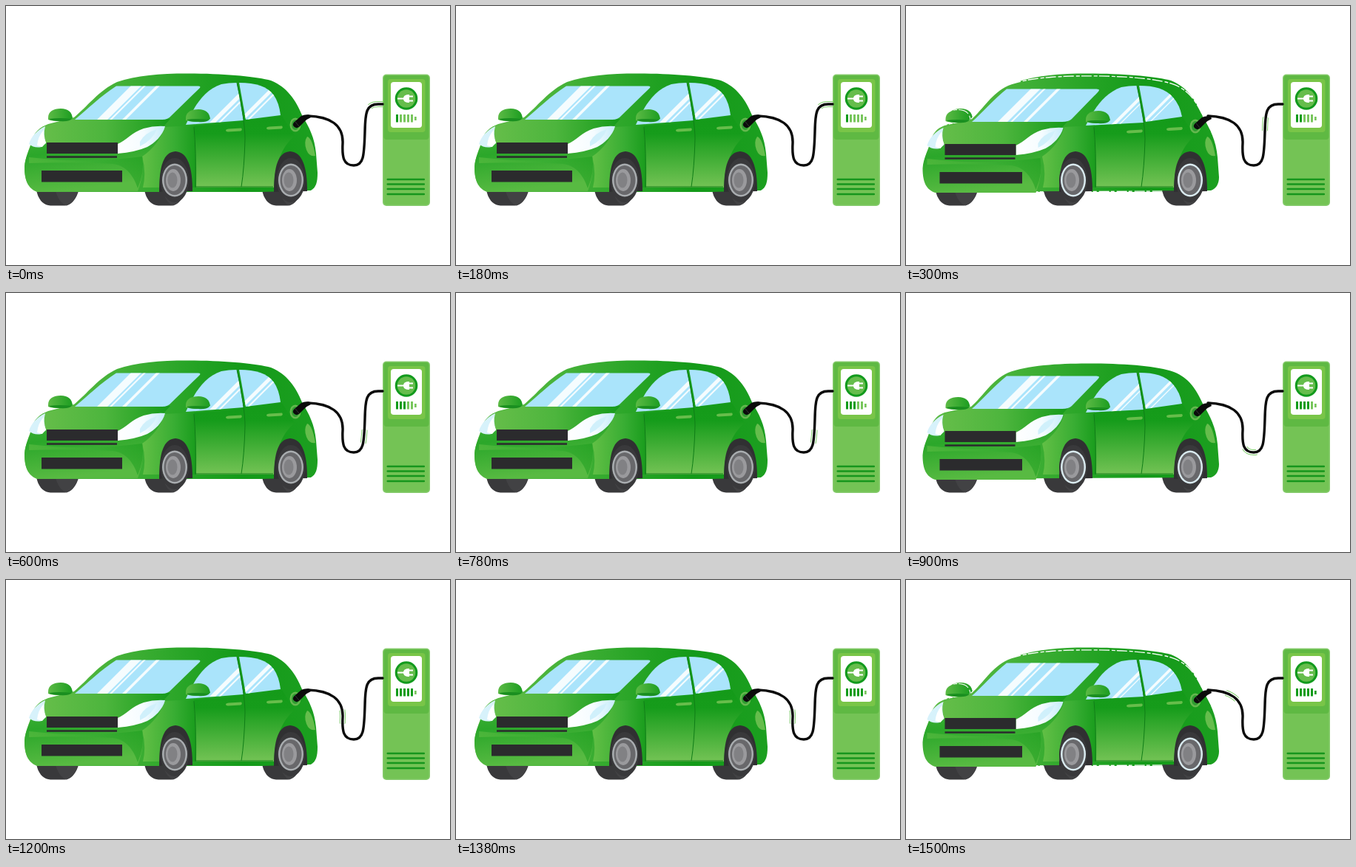
These frames come from a looping animation (600 by 351 pixels, 1.8 s). An HTML page:

```html
<!DOCTYPE html>
<html lang="en">
<head>
<meta charset="utf-8">
<title>Charging car</title>
<style>
  html, body { margin: 0; width: 100%; height: 100%; overflow: hidden; background: #fff; }
  svg { display: block; width: 100%; height: 100%; }
</style>
</head>
<body>
<svg id="stage" viewBox="0 0 600 351">
  <defs>
    <linearGradient id="paint">
      <stop offset="0" stop-color="#5cbb44"/><stop offset=".3" stop-color="#46b239"/>
      <stop offset=".6" stop-color="#22a223"/><stop offset=".75" stop-color="#149a19"/>
      <stop offset="1" stop-color="#1c9f20"/>
    </linearGradient>
    <linearGradient id="hood">
      <stop offset="0" stop-color="#66be4a"/><stop offset=".5" stop-color="#4db53d"/>
      <stop offset="1" stop-color="#159b1a"/>
    </linearGradient>
    <linearGradient id="door" x1="0" y1="0" x2="0" y2="1">
      <stop offset="0" stop-color="#149a19"/><stop offset=".25" stop-color="#169c1b"/>
      <stop offset="1" stop-color="#74c355"/>
    </linearGradient>
    <linearGradient id="face" x1="0" y1="0" x2=".25" y2="1">
      <stop offset="0" stop-color="#48b43b"/><stop offset=".45" stop-color="#2ba72a"/>
      <stop offset="1" stop-color="#58ba42"/>
    </linearGradient>
    <linearGradient id="fender">
      <stop offset="0" stop-color="#62bf45"/><stop offset=".6" stop-color="#38ad33"/>
      <stop offset="1" stop-color="#199c1c"/>
    </linearGradient>
    <linearGradient id="mirror">
      <stop offset="0" stop-color="#5cba45"/><stop offset="1" stop-color="#1c9d20"/>
    </linearGradient>
    <linearGradient id="lamp">
      <stop offset="0" stop-color="#fff"/><stop offset=".55" stop-color="#f5fcff"/>
      <stop offset="1" stop-color="#c5ecfa"/>
    </linearGradient>
  </defs>
  <g id="car"></g>
  <g id="charger"></g>
  <g fill="none">
    <path id="spark" stroke="#7fce6c" stroke-width="8"/>
    <path id="sparkGap" stroke="#fff" stroke-width="6"/>
    <path id="cable" stroke="#0b0b0b" stroke-width="3.4" stroke-linecap="round"/>
  </g>
  <g id="nozzle"></g>
</svg>
<script>
const STEP = 300, STEPS = 6;
const byId = id => document.getElementById(id);
const path = (d, fill, extra = "") => `<path d="${d}" fill="${fill}" ${extra}/>`;
const line = (d, color, width, extra = "") =>
  path(d, "none", `stroke="${color}" stroke-width="${width}" ${extra}`);
const rect = (x, y, w, h, fill, r = 0) =>
  `<rect x="${x}" y="${y}" width="${w}" height="${h}" rx="${r}" fill="${fill}"/>`;
const oval = (x, y, rx, ry, fill) =>
  `<ellipse cx="${x}" cy="${y}" rx="${rx}" ry="${ry}" fill="${fill}"/>`;
const move = (x, y, parts) => `<g transform="translate(${x} ${y})">${parts}</g>`;
const clipped = (id, d, fill, parts) =>
  `<clipPath id="${id}"><path d="${d}"/></clipPath>` + path(d, fill) +
  `<g clip-path="url(#${id})">${parts}</g>`;

// A slanted reflection running down and to the left across a window
const shine = (x, top, width) =>
  path(`M${x} ${top}h${width}l-50 50h${-width}Z`, "#fff", 'opacity=".88"');

const MIRROR = "M0 12C0 4 7 0 17 0C27 0 32 5 33 13Q27 17 17 17Q5 17 0 15Z";

const POSES = [
  {
    body: "M42 252C30 247 25 237 25 218C26 205 31 196 35 182C38 171 46 164 57 160L92 151" +
      "C109 137 126 114 150 103C178 93 215 91 255 91.5C300 92 340 96 358 101" +
      "C380 110 392 128 400 148C410 165 417 178 419 200L421 226C421 239 419 246 412 250L345 252Z",
    windshield: "M93 154C111 139 128 122 149 108.5H258Q265 108 261 112L223 149Q219 154 211 154Z",
    front: "M243 161C253 139 266 114 291 106Q301 104 312 104L321 155Z",
    rear: "M315 104C338 104 353 109 362 121Q369 131 371 148L324 154Z",
    shift: [0, 0], far: [57, 139], near: [243, 140], glassTop: 108,
    glints: [[169, 14], [186, 3], [203, 5]], sideGlints: [[325, 8], [337, 3], [361, 7], [372, 3]],
    handles: [[297, 166], [352, 163]], rim: 228, rearRim: 385, ring: "#a9adb0"
  },
  {
    body: "M40 252C28 248 23 238 23 220C24 207 29 198 33 184C36 173 41 166 52 162L88 154" +
      "C104 140 116 118 138 108C165 97 215 95 255 95.5C300 96 340 99 362 107" +
      "C382 115 392 130 401 150C411 167 419 182 421 205L423 232C423 241 419 248 412 250Z",
    windshield: "M89 157C104 144 118 127 136 112.5H256Q264 112 259 117L224 153Q220 157 211 157Z",
    front: "M243 162C253 142 266 119 291 110Q301 108 312 108L321 158Z",
    rear: "M315 108C336 108 351 112 361 124Q370 134 373 150L324 157Z",
    shift: [-2.5, 2], far: [53.5, 141], near: [243, 142], glassTop: 112,
    glints: [[169, 13], [186, 3], [204, 5]], sideGlints: [[326, 6], [336, 2], [364, 5], [374, 2]],
    handles: [[298, 168], [352, 164.5]], rim: 226, rearRim: 384, ring: "#d9eaef"
  }
];

function arch(x) {
  return path(`M${x} 252C${x} 216 ${x + 6} 198 ${x + 22} 197` +
    `C${x + 38} 198 ${x + 45} 217 ${x + 45} 251Z`, "#303032");
}

function wheel(x, ring) {
  return oval(x, 236, 19, 30, "#39393b") + oval(x, 236, 17, 22.5, ring) +
    oval(x, 236, 14.5, 20, "#68686b") + oval(x - 2, 236, 10, 15, "#9a9a9d") +
    oval(x - 3, 236, 6.5, 10.5, "#818184");
}

function tyre(x, width) {
  return path(`M${x} 238C${x} 258 ${x + 8} 270 ${x + 20} 270.5H${x + width - 20}` +
    `C${x + width - 8} 270 ${x + width} 252 ${x + width} 238Z`, "#39393b") +
    path(`M${x + width * .4} 240Q${x + width * .5} 268 ${x + width - 18} 270.5` +
    `Q${x + width - 4} 264 ${x + width} 240Z`, "#424244");
}

function sideMirror(x, y) {
  return move(x, y, path(MIRROR, "url(#mirror)") +
    path("M1 14Q16 12 32 14Q27 18 17 17Q5 17 1 14Z", "#1a8f20"));
}

// The raised outline that lingers behind the lowered car
function afterimage(low) {
  const high = POSES[0], gap = 'stroke-dasharray="14 3 5 2"';
  return path(high.body, "url(#paint)") + sideMirror(...high.far) +
    line(low.body, "#fff", 2.6, gap) + move(...low.far, line(MIRROR, "#fff", 2, gap));
}

function carFront(dx) {
  const leftLamp = path("M53 163C42 168 34 177 31 187Q38 193 48 191L54 186Q50 174 53 163Z", "#d7f2fb") +
    path("M51 168Q43 177 42 189L49 191L54 185Q50 176 51 168Z", "#fff");
  const rightLamp = path("M151 187C163 182 170 171 186 166Q200 162 215 163C212 175 201 186 191 191" +
      "Q175 198 151 200Z", "url(#lamp)") +
    path("M181 184Q187 172 204 167Q198 182 181 190Z", "#d0f0fb");
  return path("M36 183C40 171 47 165 60 161L210 162Q207 184 184 203Q188 224 178 251H42" +
      "C30 247 25 237 25 218C26 205 31 196 36 183Z", "url(#face)") +
    path("M47 166Q54 161 92 153H222L213 163Q185 164 151 187H55Q49 176 47 166Z", "url(#hood)") +
    path("M31 205Q108 214 184 204Q188 224 178 247Q168 217 145 214Q83 211 31 213Z", "url(#fender)", 'opacity=".55"') +
    leftLamp + rightLamp +
    rect(55, 185, 96, 15, "#2b2b2d") + rect(55, 203.3, 95, 2.5, "#2b2b2d") +
    rect(48, 223, 109 - dx, 15.5, "#2b2b2d");
}

function drawCar(p, index, ghost) {
  const shines = glints => glints.map(([x, width]) => shine(x, p.glassTop, width)).join("");
  const [dx, dy] = p.shift;
  const glass = (name, glints) => clipped(name + index, p[name], "#aae4fb", shines(glints));

  return (ghost ? afterimage(p) : "") +
    tyre(40 + dx * .5, 60) + tyre(186 + dx * .5, 58) + tyre(345, 56) +
    path(p.body, "url(#paint)") +
    path("M184 204Q207 188 214 164L254 162L257 246H185Q190 226 184 204Z", "url(#fender)") +
    path("M254 162Q310 160 373 149L390 176Q364 198 362 246H257Q258 197 254 162Z", "url(#door)") +
    move(dx, dy, carFront(dx)) +
    glass("windshield", p.glints) + glass("front", p.sideGlints.slice(0, 2)) +
    glass("rear", p.sideGlints.slice(2)) +
    line(`M312 ${p.glassTop - 4}Q323 156 323 180Q322 220 318 245`, "#0f7d17", 1) +
    line("M254 164Q257 197 256 245H361", "#0f7d17", 1) +
    p.handles.map(([x, y]) => path(`M${x} ${y + 2}Q${x + 1} ${y + .5} ${x + 4} ${y + .5}L${x + 21} ${y - .5}` +
      `Q${x + 23} ${y + 2} ${x + 20} ${y + 3.5}L${x + 3} ${y + 4.5}Q${x} ${y + 4.5} ${x} ${y + 2}Z`, "#67bd4b")).join("") +
    path("M407 177Q414 179 418 203Q410 205 406 195Q402 184 407 177Z", "#65bd4c") +
    move(0, dy, oval(391, 161, 7.5, 9.5, "#65b84f") + oval(391, 161, 5, 7, "#2f9c30")) +
    sideMirror(...p.far) + sideMirror(...p.near) +
    arch(207) + arch(362) + wheel(p.rim, p.ring) + wheel(p.rearRim, p.ring);
}

function drawCharger(step) {
  const vents = [235, 241.5, 248, 255].map(y => rect(514.5, y - 1.3, 51.5, 2.6, "#16961c", 1)).join("");
  const bars = Array.from({ length: 6 }, (_, i) => {
    const color = i <= step ? "#119b1b" : "#78c65d";
    return i < 5 ? rect(527 + i * 5, 147, 3, 10.5, color) : rect(552, 150, 2.7, 5, color);
  }).join("");
  const plug = path("M537 125.5C537 121.5 540 120 545 120V131C540 131 537 129.5 537 125.5Z", "#fff") +
    line("M545 122.5H550M545 128.5H550", "#fff", 2) + line("M538 125.5H529", "#fff", 2);
  return rect(509, 92.5, 64, 178.5, "#86cb6c", 5) +
    rect(510.5, 94, 61, 175.5, "#74c355", 4) +
    rect(510.5, 94, 61, 87, "#5fb943", 4) +
    rect(516, 99, 50.5, 72, "#79c548", 4) +
    rect(520, 103, 42, 62, "#fff", 4) +
    oval(541, 125.5, 15.3, 15.3, "#129a1d") + oval(541, 125.5, 12.2, 12.2, "#66bd4c") +
    plug + bars + vents;
}

const CABLE = "M509 133H503C487 133 485.5 144 485 170C484 204 483 216 470 216" +
  "C456 216 454 205 455 186C456 161 438 150 408 149";
const tracks = ["cable", "spark", "sparkGap"].map(byId);
tracks.forEach(track => track.setAttribute("d", CABLE));
const cableLength = tracks[0].getTotalLength();

const NOZZLE = path("M388 162Q387 159 391 156L399 149Q405 146 411 148L412 151Q407 153 403 157L396 164" +
  "Q391 167 388 162Z", "#0b0b0b") + line("M391 157L396 163", "#333", 1);

let shown = -1;
function render(time) {
  const step = Math.floor(time / STEP) % STEPS;
  if (step === shown) return;
  shown = step;
  const pose = step % 2;
  byId("car").innerHTML = drawCar(POSES[pose], pose, step === 1 || step === STEPS - 1);
  byId("charger").innerHTML = drawCharger(step);
  byId("nozzle").innerHTML = move(pose, pose * 2, NOZZLE);
  const dashes = `0 ${cableLength * step * .16} 18 ${cableLength}`;
  tracks.slice(1).forEach(track => track.setAttribute("stroke-dasharray", dashes));
}

const begun = performance.now();
function tick() {
  render(performance.now() - begun);
  requestAnimationFrame(tick);
}
tick();
</script>
</body>
</html>
```
